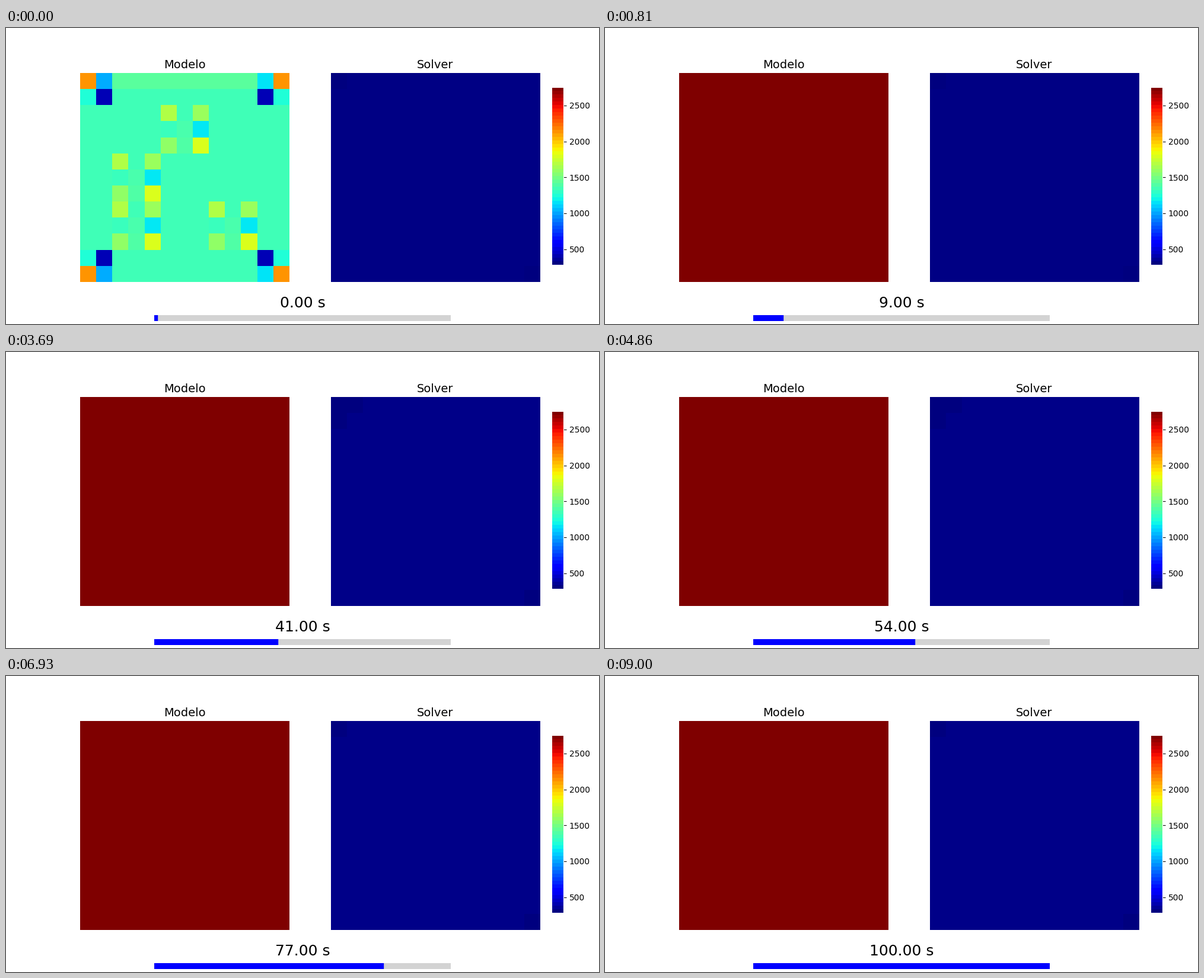
Write a matplotlib script that moves like this. It is 1000 px wide and 500 px high and loops after 9.09 s.

```python
import matplotlib.pyplot as plt
import numpy as np
from matplotlib.animation import FuncAnimation

FRAMES = 101
INTERVAL = 90
N = 13
VMIN, VMAX = 283, 2755
BACKGROUND = 1342

plt.rcParams["font.family"] = "DejaVu Sans"


def component():
    """3 by 3 heat pattern: sides alternate hot and cold, warmer downwards."""
    row, col = np.mgrid[0:3, -1:2]
    swing = np.cos(np.pi * row)
    sides = 85 + 215 * swing
    tilt = 70 * (row - 1) + 60 * swing - 22
    return BACKGROUND + 25 * row + abs(col) * sides + col * tilt


def initial_model():
    grid = np.full((N, N), float(BACKGROUND))
    grid[0] = 1415
    # Corners: hot tips, cooler neighbours, cold inner cells
    grid[::12, ::12] = 2140
    grid[::12, 1] = 1015
    grid[::12, 11] = 1150
    grid[1::10, ::12] = 1240
    grid[1::10, 1::10] = 400
    for top, left in [(2, 5), (5, 2), (8, 2), (8, 8)]:
        grid[top:top + 3, left:left + 3] = component()
    return grid


def solver_state(second):
    """Plate that warms by one colour level while two corners stay cold."""
    level = np.full((N, N), 1 if second < 30 else 2)
    level[[0, 12], [0, 12]] = 0
    if 15 <= second < 72:
        level[[0, 1], [1, 0]] = 0
    return VMIN + (level + 0.5) * (VMAX - VMIN) / 256


fig, (model_ax, solver_ax) = plt.subplots(1, 2, figsize=(10, 5), dpi=100)


def panel(ax, title, data):
    ax.set_title(title, fontsize=14)
    ax.axis("off")
    return ax.imshow(data, cmap="jet", vmin=VMIN, vmax=VMAX, interpolation="nearest")


MODEL = initial_model()
HOT = np.full((N, N), float(VMAX))
model_image = panel(model_ax, "Modelo", MODEL)
solver_image = panel(solver_ax, "Solver", solver_state(0))

# Colour scale in 50 bands with a white outline
scale_ax = fig.add_axes([0.92, 0.2, 0.02, 0.6])
scale_ax.pcolormesh([0, 1], np.linspace(VMIN, VMAX, 51), np.arange(50)[:, None],
                    cmap=plt.get_cmap("jet", 50))
scale_ax.spines[:].set_color("white")
scale_ax.set(xlim=(0, 1), ylim=(VMIN, VMAX), xticks=[])
scale_ax.yaxis.tick_right()
scale_ax.set_yticks(range(500, 2501, 500))

# Progress bar
bar_ax = fig.add_axes([0.25, 0.01, 0.5, 0.02], facecolor="lightgray")
bar_ax.set(xlim=(0, 1), ylim=(0, 1), xticks=[], yticks=[])
bar_ax.spines[:].set_visible(False)
bar = bar_ax.barh(0.5, 0, height=2, facecolor="blue", edgecolor="blue", linewidth=1)[0]

clock = fig.text(0.5, 0.056, "", fontsize=18, ha="center", va="baseline")


def update(second):
    model_image.set_data(MODEL if second == 0 else HOT)
    solver_image.set_data(solver_state(second))
    bar.set_width((second + 1) / FRAMES)
    clock.set_text(f"{second:.2f} s")
    return model_image, solver_image, bar, clock


anim = FuncAnimation(fig, update, frames=FRAMES, interval=INTERVAL, repeat=True)
plt.show()
```
